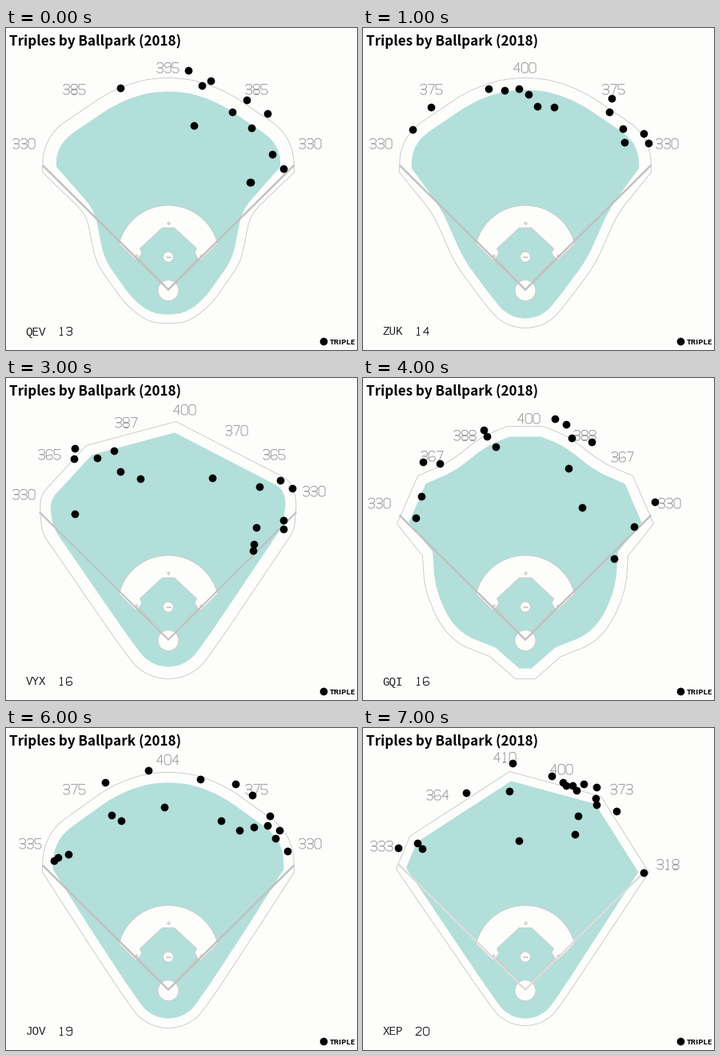
Write a matplotlib script that moves like this. It is 439x403 px and loops after 8000 ms.

```python
import numpy as np
import matplotlib.pyplot as plt
from matplotlib.animation import ArtistAnimation
from matplotlib.collections import LineCollection
from matplotlib.patches import Circle, PathPatch, Polygon
from matplotlib.path import Path

W, H, DPI = 439, 403, 64
PX = 72 / DPI  # points per pixel
PAPER, GRASS = "#fdfdfc", "#b2dfda"
WALL, FOUL, LABEL = "#c9c9c9", "#c0c0c0", "#a3a3a3"
MID = 202.5
HOME = (MID, 327)

fig = plt.figure(figsize=(W / DPI, H / DPI), dpi=DPI, facecolor=PAPER)
ax = fig.add_axes([0, 0, 1, 1])
ax.set(xlim=(-0.5, W - 0.5), ylim=(H - 0.5, -0.5))
ax.axis("off")


def mirror(points, axis=MID):
    return [(2 * axis - p[0], *p[1:]) for p in points[::-1]]


# Single-stroke digits on a 4 x 6 grid
BOWLS = [(1, 0), (3, 0), (4, 1), (4, 2), (3, 3), (1, 3),
         (3, 3), (4, 4), (4, 5), (3, 6), (1, 6)]
SIDE = [(2, 0), (3, 0), (4, 1), (4, 5), (3, 6), (2, 6)]
SIX = [(4, 1), (3, 0), (1, 0), (0, 1), (0, 5)] + BOWLS[:5:-1] + [(0, 4)]
DIGITS = {
    "0": SIDE + mirror(SIDE, 2),
    "1": [(1, 1), (2, 0), (2, 6), (1, 6), (3, 6)],
    "2": [(0, 1)] + BOWLS[:4] + [(0, 6), (4, 6)],
    "3": [(0, 1)] + BOWLS + [(0, 5)],
    "4": [(3, 6), (3, 0), (0, 4), (4, 4)],
    "5": [(4, 0), (0, 0), (0, 3)] + BOWLS[6:] + [(0, 5)],
    "6": SIX,
    "7": [(0, 0), (4, 0), (1.5, 6)],
    "8": BOWLS + mirror(BOWLS, 2),
    "9": [(4 - x, 6 - y) for x, y in SIX],
}


def number(value, x, y, color=LABEL, width=8, height=12.5, pitch=9.8):
    scale = np.array([width / 4, height / 6])
    lines = [np.array(DIGITS[d]) * scale + (x + i * pitch, y)
             for i, d in enumerate(str(value))]
    return ax.add_collection(LineCollection(
        lines, colors=color, linewidths=1.05 * PX, zorder=5))


def unit(v):
    return v / np.hypot(*v)


def inset(points, field, foul):
    """Move a clockwise outline inward to the edge of the grass."""
    pts = [np.array(p[:2], float) for p in points]
    out = []
    for i, p in enumerate(pts):
        a, b = unit(p - pts[i - 1]), unit(pts[(i + 1) % len(pts)] - p)
        na, nb = np.array([-a[1], a[0]]), np.array([-b[1], b[0]])
        depth = field if p[1] < 183 else foul
        out.append((*(p + depth * (na + nb) / (1 + na @ nb)), *points[i][2:]))
    return out


def outline(points, radius):
    """Closed path; a third value on a point overrides its corner radius."""
    pts = [np.array(p[:2], float) for p in points]
    verts, codes = [], []
    for i, p in enumerate(points):
        here, r = pts[i], p[2] if len(p) > 2 else radius
        ends = []
        for other in (pts[i - 1], pts[(i + 1) % len(pts)]):
            reach = min(r, np.hypot(*(other - here)) / 2)
            ends.append(here + unit(other - here) * reach)
        verts += [ends[0], here, ends[1]]
        codes += [Path.LINETO, Path.CURVE3, Path.CURVE3]
    codes[0] = Path.MOVETO
    return Path(verts + [verts[0]], codes + [Path.CLOSEPOLY])


def backstop(bottom, r):
    """Round end behind home plate, from right to left."""
    return [(MID + r * np.cos(a), bottom - r + r * np.sin(a), r)
            for a in np.radians(np.linspace(36, 144, 6))]


def park(code, poles, labels, wall, hits, radius=0, field=13, foul=12,
         line=FOUL, line_width=2.4):
    grass = inset(wall, field, foul)
    art = [
        ax.add_patch(PathPatch(outline(wall, radius), fc="none", ec=WALL,
                               lw=0.9 * PX, zorder=1)),
        ax.add_patch(PathPatch(outline(grass, radius), fc=GRASS, ec="none",
                               zorder=2)),
        ax.plot(*zip(poles[0], HOME, poles[1]), color=line,
                lw=line_width * PX, solid_joinstyle="miter", zorder=4)[0],
        ax.scatter(*zip(*hits), s=(9.7 * PX) ** 2, c="black", lw=0, zorder=6),
        ax.text(24, 384, code, family="Liberation Mono", size=14.3 * PX,
                color="#222222"),
        number(len(hits), 65.5, 374, "#222222", 7, 10, 9.6),
    ]
    scenes.append(art + [number(*label) for label in labels])


def random_hits(count, seed):
    """Landing spots scattered around the outfield wall."""
    rng = np.random.default_rng(seed)
    a = np.radians(rng.uniform(-42, 42, count))
    d = 215 + 48 * np.cos(2 * a) + rng.uniform(-40, 18, count)
    return list(zip(MID + d * np.sin(a), HOME[1] - d * np.cos(a)))


def infield():
    a = np.radians(np.linspace(194, 346, 50))
    arc = list(zip(MID + 63.5 * np.cos(a), 285 + 63.5 * np.sin(a)))
    side = [(243, 290.5), (239, 287), (212, 318)]
    ax.add_patch(Polygon(arc + side + mirror(side), fc=PAPER, ec=WALL,
                         lw=0.9 * PX, zorder=3))
    half = [(210, 249.5), (238, 275.5), (235.5, 281), (239, 287), (211, 317)]
    ax.add_patch(Polygon(half + mirror(half), fc=GRASS, ec=WALL,
                         lw=0.8 * PX, zorder=3.1))
    for y, r in ((328, 13), (286, 6.5)):
        ax.add_patch(Circle((MID, y), r, fc=PAPER, ec=WALL,
                            lw=0.9 * PX, zorder=3.2))
    ax.plot([200, 205], [286, 286], color=FOUL, lw=1.5 * PX, zorder=3.3)
    ax.scatter([MID, 162, 243], [243, 284, 284], marker="D",
               s=(4 * PX) ** 2, c="#d6d6d6", lw=0, zorder=3.3)


infield()
ax.text(4, 21, "Triples by Ballpark (2018)", family="Noto Sans CJK JP",
        weight="bold", size=17 * PX, color="black")
ax.scatter([396.5], [391], s=(9.7 * PX) ** 2, c="black", lw=0)
ax.text(404.5, 395, "TRIPLE", family="Noto Sans CJK JP", weight="bold",
        size=9.3 * PX, color="black")

scenes = []
POLES = [(46, 172), (359, 172)]
SPOTS = [(8, 138), (71, 70), (188, 43), (299, 70), (366, 138)]
FENCE = [(45, 180, 0), (46, 152), (60, 126), (128, 80), (164, 66), (190, 62)]


def round_labels(*values):
    return [(v, *spot) for v, spot in zip(values, SPOTS)]


half = [(180, 369), (150, 347), (112, 293), (100, 233)] + FENCE
park("QEV", POLES, round_labels(330, 385, 395, 385, 330), half + mirror(half),
     [(227, 52), (244, 71), (255, 65), (142, 74), (300, 89), (282, 104),
      (326, 106), (306, 124), (234, 121), (332, 157), (346, 175),
      (304, 192), (305, 192)],
     radius=16, field=17, foul=11)

half = [(115, 295), (87, 232)] + FENCE
park("ZUK", POLES, round_labels(330, 375, 400, 375, 330),
     half + mirror(half) + backstop(376, 55), random_hits(14, 4),
     radius=16, field=15)

park("WOJ", [(55, 180), (350, 180)],
     [(318, 21, 174), (399, 96, 62), (408, 184, 43), (385, 299, 98),
      (314, 355, 181)],
     [(109, 282), (78, 205), (55, 181), (55, 158), (70, 142), (125, 86),
      (160, 63), (203, 55), (238, 62), (262, 84), (332, 152), (350, 180),
      (329, 207), (298, 280)] + backstop(371, 40),
     [(216, 39), (168, 66), (138, 84), (163, 85), (169, 88), (162, 97),
      (78, 103), (151, 142), (73, 162), (246, 104), (255, 122),
      (292, 127), (333, 139), (349, 163), (308, 198)],
     radius=14, field=14)

park("VYX", [(42, 168), (362, 168)],
     [(330, 8, 139), (365, 40, 89), (387, 136, 49), (400, 209, 33),
      (370, 274, 59), (365, 321, 89), (330, 371, 135)],
     [(45, 194), (42, 168), (43, 146), (100, 84, 0), (212, 54, 0), (355, 128),
      (363, 152), (360, 190)] + backstop(377, 60),
     [(85, 87), (84, 100), (113, 99), (134, 90), (142, 116), (167, 125),
      (85, 169), (257, 124), (316, 135), (342, 127), (357, 137),
      (346, 177), (346, 188), (312, 186), (309, 207), (308, 215)],
     radius=10, foul=15, line_width=2)

half = [(190, 376), (158, 348), (107, 328, 45), (77, 270, 45), (74, 222),
        (42, 182), (68, 122), (107, 105, 15), (148, 73, 15), (180, 60)]
park("GQI", POLES,
     [(330, 6, 150), (367, 72, 91), (388, 113, 65), (400, 193, 44),
      (388, 263, 65), (367, 310, 92), (330, 369, 150)],
     half + mirror(half),
     [(150, 64), (154, 72), (165, 85), (74, 104), (95, 106), (72, 147),
      (65, 174), (239, 50), (253, 57), (260, 74), (285, 79), (256, 112),
      (273, 161), (364, 154), (338, 185), (313, 225)],
     foul=13)

park("KZU", [(52, 178), (359, 172)],
     [(315, 41, 147), (362, 74, 96), (409, 263, 49), (373, 306, 88),
      (326, 354, 138)],
     [(95, 249), (97, 229), (50, 179), (112, 122), (107, 110), (191, 39),
      (208, 41), (213, 33), (240, 37, 8), (288, 96), (298, 97), (359, 172),
      (326, 206), (327, 234, 18), (311, 250, 12), (235, 343), (203, 358, 10),
      (180, 350)],
     [(126, 84), (145, 62), (166, 52), (166, 60), (227, 64), (233, 48),
      (241, 41), (229, 100), (250, 82), (249, 91), (262, 92), (255, 103),
      (268, 103), (281, 82), (302, 84), (342, 132), (359, 166),
      (340, 179)],
     radius=3, field=12, foul=9, line_width=2)

half = [(98, 262)] + [(x, 180 - 1.06 * (180 - y), *r) for x, y, *r in FENCE]
park("JOV", POLES,
     [(v, max(x, 16), y - 10 * (x == 188)) for v, x, y in
      round_labels(335, 375, 404, 375, 330)],
     half + mirror(half) + backstop(376, 55), random_hits(19, 9),
     radius=16)

park("XEP", [(44, 170), (350, 181)],
     [(333, 9, 141), (364, 79, 77), (410, 163, 30), (400, 234, 45),
      (373, 309, 70), (318, 367, 164)],
     [(41, 176), (58, 135), (183, 54), (297, 85), (357, 180)]
     + backstop(373, 50),
     [(186, 43), (128, 80), (182, 78), (194, 140), (43, 149), (67, 143),
      (73, 150), (235, 59), (249, 67), (253, 71), (261, 71), (266, 77),
      (275, 69), (291, 73), (290, 87), (291, 95), (316, 103), (268, 109),
      (264, 132), (350, 180)],
     field=11, foul=9, line="#dcdcdc")

anim = ArtistAnimation(fig, scenes, interval=1000, repeat=True, repeat_delay=0)
plt.show()
```
